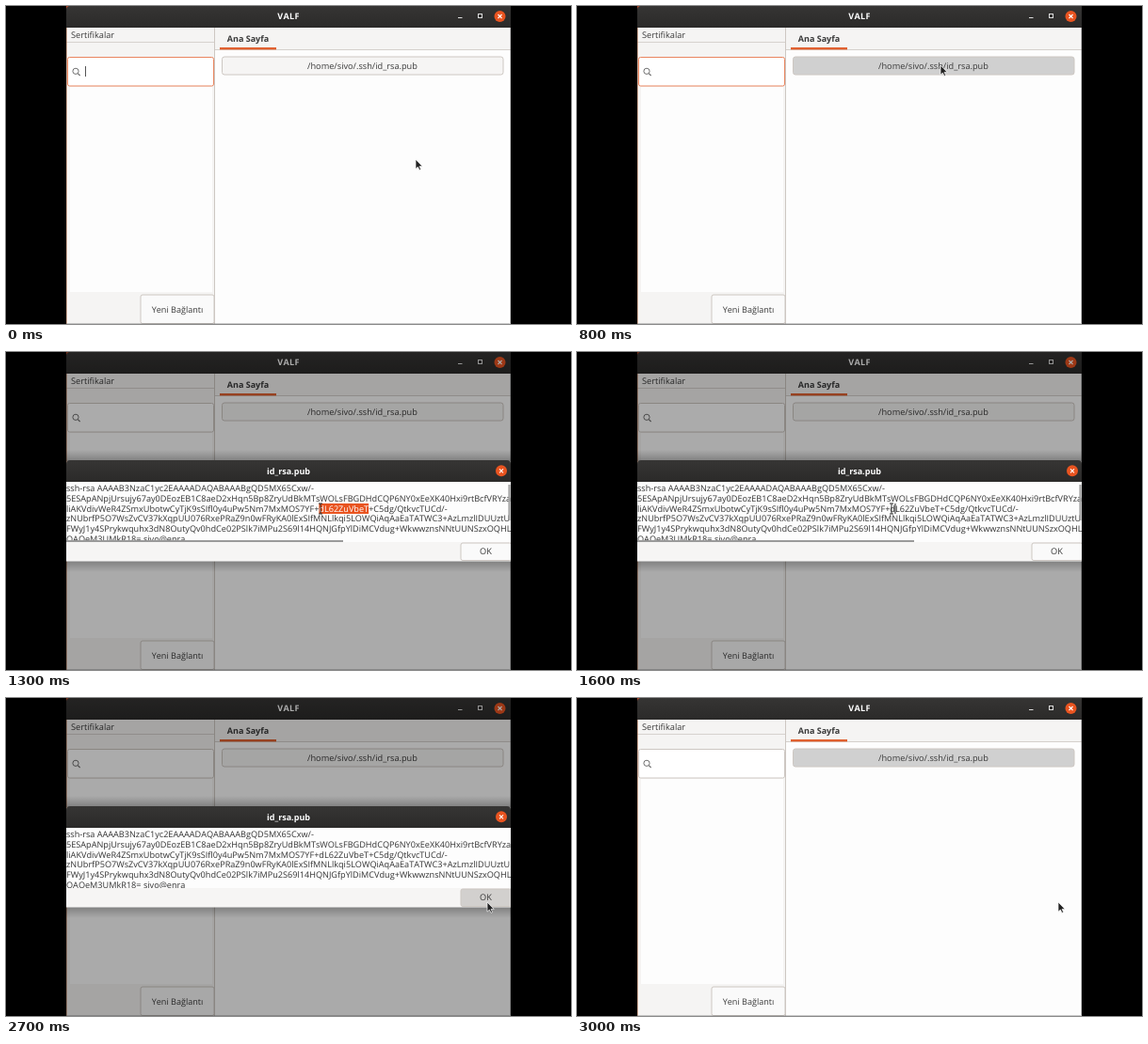
Write an HTML page that moves like this. It is 600 px wide and 338 px high and loops after 3.1 s.

```html
<!DOCTYPE html>
<html lang="tr">
<head>
<meta charset="utf-8">
<title>VALF</title>
<style>
  html, body { margin: 0; width: 100%; height: 100%; overflow: hidden; background: #000; }
  svg { display: block; position: absolute; left: 0; top: 0; }
  text { font: 9.2px "Open Sans", "Noto Sans", sans-serif; fill: #3a3a3a;
         font-kerning: none; text-rendering: geometricPrecision; white-space: pre; }
  #key text { font-size: 9.14px; fill: #333; }
  .mid { text-anchor: middle; }
  .bold { font-weight: 700; font-size: 9px; }
  .light { fill: #fff; }
  .line { stroke: #cdc7c2; }
</style>
</head>
<body>
<svg width="600" height="338" viewBox="0 0 600 338">
  <defs>
    <clipPath id="windowClip"><rect x="64" width="472" height="338"/></clipPath>
    <clipPath id="keyClip"><rect x="64" y="138" width="472" height="64"/></clipPath>
    <linearGradient id="bar" x2="0" y2="1">
      <stop stop-color="#363534"/><stop offset="1" stop-color="#2b2a29"/>
    </linearGradient>
    <linearGradient id="shade" x2="0" y2="1">
      <stop stop-opacity="0"/><stop offset="1" stop-opacity=".25"/>
    </linearGradient>
    <g id="close">
      <circle r="6" fill="#e95420"/>
      <path d="M-2-2 2 2M2-2-2 2" stroke="#fff" stroke-width="1.1"/>
    </g>
  </defs>

  <g clip-path="url(#windowClip)">
    <rect x="64" width="472" height="338" fill="#fdfdfd"/>

    <!-- side panel -->
    <rect x="64" y="23" width="158" height="315" fill="#f5f4f3"/>
    <path d="M64 38.5H221" class="line" stroke-opacity=".75"/>
    <rect x="68" y="86" width="151" height="218" fill="#fdfdfd"/>
    <text x="69" y="34">Sertifikalar</text>
    <rect id="search" x="65.5" y="54.5" width="155" height="30.5" rx="2" fill="#fff"/>
    <g fill="none" stroke="#707070">
      <circle cx="74" cy="69.3" r="3.1"/><path d="M76.3 71.6 78.6 74" stroke-width="1.2"/>
    </g>
    <path id="searchCaret" d="M84.5 64V75" stroke="#555"/>
    <rect x="143" y="307" width="78" height="30.5" rx="2" fill="#fafafa" class="line"/>
    <text x="182" y="325.5" class="mid" style="font-size:9.05px">Yeni Bağlantı</text>
    <path d="M221.5 23V338" class="line"/>

    <!-- page -->
    <rect x="222" y="23" width="314" height="23" fill="#f5f4f3"/>
    <path d="M222 46.5H536" stroke="#d5d0cc"/>
    <rect x="227" y="44" width="60" height="2.4" fill="#e0602f"/>
    <text x="257" y="38" class="mid bold">Ana Sayfa</text>
    <rect id="fileButton" x="229.5" y="54" width="298.5" height="19" rx="2.5" class="line"/>
    <text x="378.5" y="67" class="mid">/home/sivo/.ssh/id_rsa.pub</text>

    <!-- title bar and window edges -->
    <rect x="64" width="472" height="23" fill="url(#bar)"/>
    <text x="300" y="14.4" class="mid bold light" style="letter-spacing:.4px">VALF</text>
    <path d="M480 12.5H484.5" stroke="#ddd"/>
    <rect x="501.5" y="8.5" width="4" height="4" fill="none" stroke="#ddd"/>
    <use href="#close" x="524.5" y="11"/>
    <path d="M64.5 23V338" stroke="#b87a5a" stroke-opacity=".6"/>
    <path d="M64 337.5H535.5V23" fill="none" stroke="#777" stroke-opacity=".4"/>
    <path d="M64 0h3q-2.5 .5-3 3z" fill="#b5482a"/>
    <rect id="dim" x="64" width="472" height="338" fill-opacity=".33"/>

    <!-- key dialog -->
    <g id="dialog">
      <rect x="64" y="104" width="472" height="12" fill="url(#shade)"/>
      <rect x="64" y="222" width="472" height="12" fill="url(#shade)" transform="matrix(1 0 0 -1 0 456)"/>
      <path d="M64 138V119q0-4 4-4H532q4 0 4 4V138z" fill="url(#bar)"/>
      <text x="300" y="129.8" class="mid bold light">id_rsa.pub</text>
      <use href="#close" x="526" y="126.3"/>
      <rect x="64" y="138" width="472" height="84.5" fill="#f6f5f4"/>
      <rect x="64" y="138" width="472" height="64" fill="#fdfdfd"/>
      <g clip-path="url(#keyClip)">
        <rect id="selection" y="161" height="11" fill="#e95420"/>
        <g id="key"></g>
        <path id="keyCaret" stroke="#222"/>
      </g>
      <g id="scrollbars" fill="#9a9a9a">
        <rect x="64" y="200" width="294" height="2"/>
        <rect x="533.5" y="141" width="2" height="38"/>
      </g>
      <rect id="okButton" x="483" y="203" width="54" height="18.5" rx="2" class="line"/>
      <text x="509.5" y="215.3" class="mid">OK</text>
    </g>
  </g>

  <g id="pointer">
    <path id="arrow" d="M0 0V10.2L2.4 8.1 4 11.4 5.6 10.6 4.1 7.4H7.2z" fill="#222" stroke="#fff" stroke-width=".7"/>
    <path id="beam" d="M-2-5.5H2M0-5.5V5.5M-2 5.5H2" fill="none" stroke="#333"/>
  </g>
</svg>

<script>
const LOOP = 3100, STEP = 100;
const el = id => document.getElementById(id);

const word = "dL62ZuVbeT";
const keyLines = [
  "ssh-rsa AAAAB3NzaC1yc2EAAAADAQABAAABgQD5MX65Cxw/-",
  "5ESApANpjUrsujy67ay0DEozEB1C8aeD2xHqn5Bp8ZryUdBkMTsWOLsFBGDHdCQP6NY0xEeXK40Hxi9rtBcfVRYzafl",
  `liAKVdivWeR4ZSmxUbotwCyTjK9sSIfl0y4uPw5Nm7MxMOS7YF+<tspan id="word">${word}</tspan>+C5dg/QtkvcTUCd/-`,
  "zNUbrfP5O7WsZvCV37kXqpUU076RxePRaZ9n0wFRyKA0lExSIfMNLlkqi5LOWQiAqAaEaTATWC3+AzLmzlIDUUztU",
  "FWyJ1y4SPrykwquhx3dN8OutyQv0hdCe02PSlk7iMPu2S69l14HQNJGfpYlDiMCVdug+WkwwznsNNtUUNSzxOQHL",
  "OAOeM3UMkR18= sivo@enra"
];
el("key").innerHTML = keyLines
  .map((line, i) => `<text x="64" y="${148.4 + i * 10.65}">${line}</text>`).join("");

// Place the selection and the caret from the laid-out text.
const wordLine = el("word").parentNode;
const wordStart = wordLine.textContent.indexOf(word);
const startX = wordLine.getStartPositionOfChar(wordStart).x;
const endX = wordLine.getEndPositionOfChar(wordStart + word.length - 1).x;
const caretX = wordLine.getEndPositionOfChar(wordStart).x;
el("selection").setAttribute("x", startX);
el("selection").setAttribute("width", endX - startX);
el("keyCaret").setAttribute("d", `M${caretX} 161V172`);

// Pointer stops: time, x, y
const stops = [
  [0, 435, 163], [600, 386, 63], [900, 386, 63], [1200, 334, 166.5],
  [1700, 334, 166.5], [2000, 500, 228], [2400, 511, 217], [LOOP, 511, 217]
];

function pointerAt(t) {
  const i = stops.findIndex(stop => stop[0] > t);
  const [t0, x0, y0] = stops[i - 1], [t1, x1, y1] = stops[i];
  const p = (t - t0) / (t1 - t0), eased = p * p * (3 - 2 * p);
  return [x0 + (x1 - x0) * eased, y0 + (y1 - y0) * eased];
}

function show(id, visible) {
  el(id).style.display = visible ? "" : "none";
}

function render(t) {
  const within = (from, to) => t >= from && t < to;
  const open = within(900, 2900);
  const selected = within(1300, 1600);
  const [x, y] = pointerAt(t);
  const overText = open && y > 138 && y < 202;

  el("pointer").setAttribute("transform", `translate(${x} ${y})`);
  show("arrow", !overText);
  show("beam", overText);

  show("dim", open);
  show("dialog", open);
  show("scrollbars", t < 2400);
  show("selection", selected);
  el("word").style.fill = selected ? "#fff" : "";
  show("keyCaret", within(1600, 2200));
  el("okButton").style.fill = within(2700, 2900) ? "#d2d0ce" : "#fafafa";

  show("searchCaret", t < 600);
  el("search").style.stroke = t < 900 ? "#e9855f" : "#cdc7c2";
  const pressed = within(800, 900) || t >= 2900;
  el("fileButton").style.fill = pressed ? "#d0d0d0" : within(600, 800) ? "#fcfcfc" : "#f6f5f4";
}

const start = performance.now();
function tick() {
  const t = (performance.now() - start) % LOOP;
  render(Math.floor(t / STEP) * STEP);
  requestAnimationFrame(tick);
}
tick();
</script>
</body>
</html>
```
